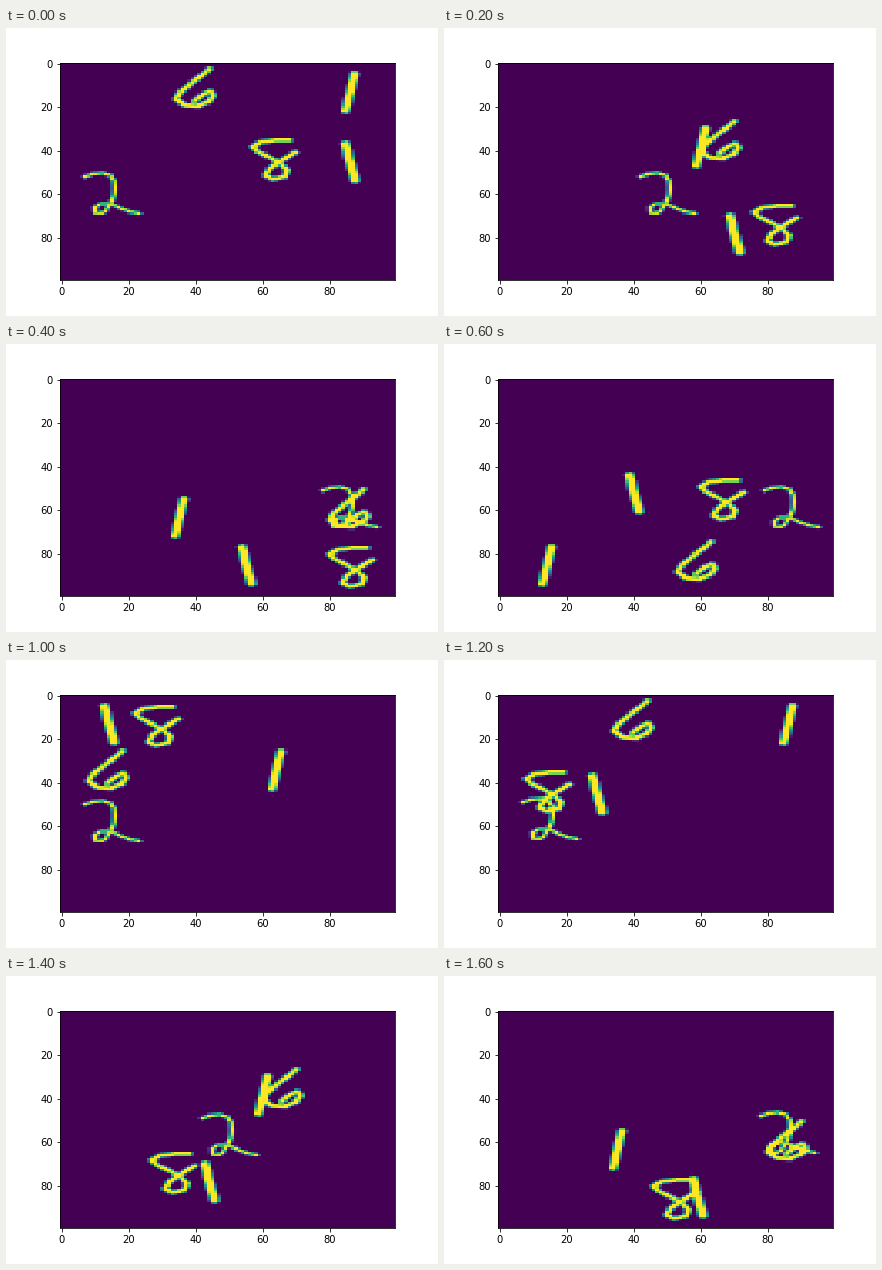
Write a matplotlib script that moves like this. It is 432 by 288 pixels and loops after 1800 ms.

```python
import numpy as np
import matplotlib.pyplot as plt
from matplotlib.animation import FuncAnimation

SIZE, BOX, FRAMES = 100, 28, 9
LIMIT = SIZE - BOX


def glyph(points, width):
    """Rasterise a soft pen stroke through the points on a BOX x BOX grid."""
    y, x = np.mgrid[:BOX, :BOX] + 0.5
    dist = np.full((BOX, BOX), np.inf)
    for (ax_, ay), (bx, by) in zip(points, points[1:]):
        dx, dy = bx - ax_, by - ay
        t = np.clip(((x - ax_) * dx + (y - ay) * dy) / (dx * dx + dy * dy), 0, 1)
        dist = np.minimum(dist, np.hypot(x - ax_ - t * dx, y - ay - t * dy))
    return np.clip(width / 2 + 0.5 - dist, 0, 1)


def bounce(pos, vel):
    """Integer positions of a box that stops at a wall and turns back."""
    pos, vel = np.array(pos, float), np.array(vel, float)
    path = []
    for _ in range(FRAMES):
        path.append(pos.astype(int))
        pos = pos + vel
        vel = np.where((pos < 0) | (pos > LIMIT), -vel, vel)
        pos = np.clip(pos, 0, LIMIT)
    return path


two = glyph([(7.5, 6.6), (9.8, 5.4), (12.6, 5.0), (14.9, 5.9), (16.2, 8.5),
             (16.4, 12), (16.2, 15), (15.2, 18.4), (13.6, 22.2), (12.4, 23.3),
             (10.6, 23.2), (10.5, 20.6), (12.2, 19), (15.2, 19), (18, 21),
             (21, 22.7), (23.7, 23.4)], 1.3)
eight = glyph([(19.6, 5.9), (15.5, 5.9), (11, 6.7), (8.4, 8.8), (10.1, 11.2),
               (13.7, 13.8), (17, 16.8), (19, 19.8), (18, 22.6), (14.5, 23.7),
               (12.4, 21.9), (13.7, 18.7), (17, 15.3), (21.3, 11.4)], 1.8)
six = glyph([(18.7, 3.1), (16.1, 6.4), (12.8, 10.2), (9.4, 14.6), (8.6, 17),
             (11.3, 19.9), (15.2, 20.2), (18.6, 17.9), (19.9, 15.1),
             (18.8, 13.4), (16.7, 14.9), (14, 18)], 1.9)
one_right = glyph([(16, 5.4), (14.6, 14), (13.3, 22.4)], 2.6)
one_left = glyph([(13.3, 5.6), (14.4, 13), (16.2, 22.2)], 2.8)

digits = [
    (two, bounce((0.3, 46.9), (35.6, -0.5))),
    (eight, bounce((49.3, 30.2), (19.2, 30.4))),
    (six, bounce((26.3, 0.1), (26.3, 24.3))),
    (one_right, bounce((72, 0), (-25.3, 25.2))),
    (one_left, bounce((72, 32.3), (-15.1, 32.8))),
]


def scene(i):
    canvas = np.zeros((SIZE, SIZE))
    for shape, path in digits:
        x, y = path[i]
        canvas[y:y + BOX, x:x + BOX] += shape
    return np.clip(canvas, 0, 1)


fig, ax = plt.subplots(figsize=(6, 4), dpi=72)
fig.subplots_adjust(left=0.125, right=0.9, bottom=0.125, top=0.88)
image = ax.imshow(scene(0), cmap="viridis", vmin=0, vmax=1,
                  interpolation="nearest", aspect="auto")
ax.set_xticks(range(0, SIZE, 20))
ax.set_yticks(range(0, SIZE, 20))


def update(i):
    image.set_data(scene(i))
    return [image]


anim = FuncAnimation(fig, update, frames=FRAMES, interval=200,
                     init_func=lambda: [image], repeat=True, repeat_delay=0)
plt.show()
```
